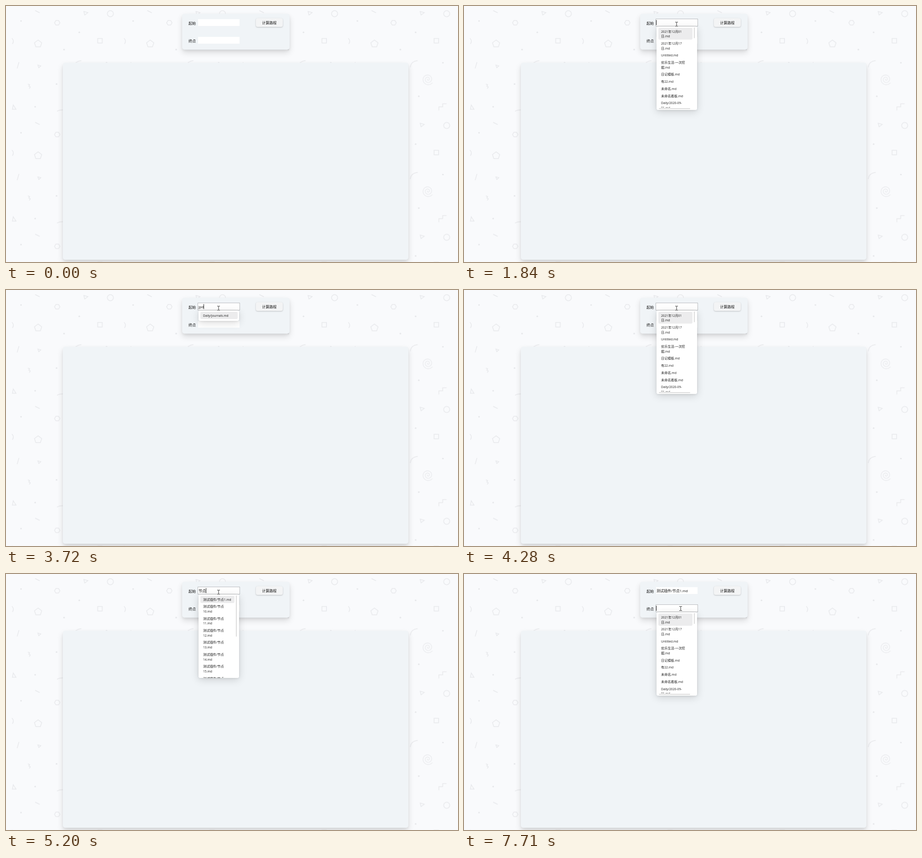
Recreate the animation shown at these times as an HTML page. Size 993 by 564 pixels, loop 8000 ms.

```html
<!DOCTYPE html>
<html>
<head>
<meta charset="utf-8">
<title>Path search</title>
<style>
html, body { margin: 0; width: 100%; height: 100%; overflow: hidden; background: #f9fafc; }
body { position: relative; font: 8px/12px "Open Sans", "Noto Sans CJK SC", "Noto Sans CJK", sans-serif; color: #111; }
div, svg { position: absolute; box-sizing: border-box; }
div { white-space: pre; }
b { font-weight: inherit; font-size: .94em; line-height: 0; }
.card { background: #f0f4f7; border-radius: 5px; box-shadow: 0 7px 14px rgba(0,0,0,.12), 0 3px 5px rgba(0,0,0,.06); }
.field { left: 421px; width: 93px; height: 17px; padding-left: 1px; line-height: 15px; background: #fff; background-clip: padding-box; border: 1px solid transparent; }
.field.on { border-color: #b8babd; }
.button { left: 549px; top: 27px; width: 59px; height: 19px; border-radius: 4px; background: #f3f4f5; line-height: 19px; text-align: center; box-shadow: 0 1px 3px rgba(0,0,0,.22); }
.popup { left: 423px; width: 89px; background: #fff; border-radius: 4px; overflow: hidden; font-size: 7.2px; line-height: 10.7px; color: #1c1c1c; }
.shade { left: 423px; width: 89px; border-radius: 4px; box-shadow: 0 1px 5px rgba(0,0,0,.09), 0 4px 18px rgba(0,0,0,.15); }
.list { left: 4px; top: 3px; overflow: hidden; }
.list div { position: static; padding: 2.5px 6px; border-radius: 3px; }
.list div:first-child { background: #ececed; }
.bar { background: #dcdcdc; border-radius: 1px; }
#caret { width: 1px; height: 11px; background: #222; }
</style>
</head>
<body>
<svg width="993" height="564">
  <defs>
    <pattern id="tile" width="246.3" height="246.3" patternUnits="userSpaceOnUse">
      <g fill="none" stroke="#e7e8eb" stroke-width="1.5">
        <path d="M64 10l10 5M171 12l9 2.500-7 5.500zM13 71q6 6 1 12.500M28.500 123.500l-4 14M70 130l6.500 2-4.500 4zM16 218l6 9.500-8 0zM149.500 135q1-13 16-14.500M112 232q6-4 18-3M212 230v-8h8.500v-6.500h8.500M48 172l4 1.500-2 3 3.500 2-2.500 3.500"/>
        <path d="M106.500 37l3-5h6l3 5-3 5h-6zM70.500 75l8 6-3 9h-10l-3-9z"/>
        <circle cx="229.300" cy="17" r="6.700"/>
        <rect x="201.500" y="71.500" width="10" height="10"/>
        <path id="spiral" stroke-width="1.200"/>
      </g>
      <g id="dots" fill="#e4e5e8"></g>
    </pattern>
  </defs>
  <rect width="993" height="564" fill="url(#tile)"/>
</svg>
<div class="card" style="left:387px;top:17px;width:236px;height:78.500px"></div>
<div class="card" style="left:125px;top:125px;width:759px;height:434px"></div>
<div style="left:401px;top:31.500px">起始</div>
<div style="left:401px;top:71px">终点</div>
<div class="button">计算路程</div>
<div class="field" id="from" style="top:28px"></div>
<div class="field" id="to" style="top:67.300px"></div>
<div class="shade" id="shade"></div>
<div class="popup" id="popup"></div>
<div id="caret"></div>
<svg id="mouse" width="30" height="30" viewBox="-15 -15 30 30">
  <g id="arrow">
    <circle r="7.500" fill="#fdec1e" opacity=".88"/>
    <path d="M.500-1.500v9.500l2.200-2 1.600 3.700 1.700-.700-1.600-3.600h3z" fill="#fff" stroke="#333" stroke-width=".9"/>
  </g>
  <path id="beam" d="M-3-4.500h2.300l.700.500.700-.500h2.300M0-4v8M-3 4.500h2.300l.700-.500.700.500h2.300" fill="none" stroke="#333"/>
</svg>
<script>
const $ = id => document.getElementById(id);
const LOOP = 8000;

const dots = [[33, 33], [161, 58], [127.5, 96], [111, 172], [221, 125], [168, 199], [64, 222]];
$('dots').innerHTML = dots.map(([x, y]) => `<circle cx="${x}" cy="${y}" r="1.7"/>`).join('');

let spiral = '';
for (let a = 0; a < 16.3; a += .2) {
  const dir = 16.85 - a, r = a * .78;
  spiral += `${a ? 'L' : 'M'}${188 + r * Math.cos(dir)} ${161.5 + r * Math.sin(dir)}`;
}
$('spiral').setAttribute('d', spiral);

// Latin runs are set slightly smaller than the Chinese text.
const rich = s => s.replace(/[!-~]+/g, '<b>$&</b>');

const bar = (x, y, w, h) => `<div class="bar" style="left:${x}px;top:${y}px;width:${w}px;height:${h}px"></div>`;
const menu = (items, width, clip, height, bars = '') => ({
  height,
  html: `<div class="list" style="width:${width}px;height:${clip}px">` +
    items.map(s => `<div>${rich(s)}</div>`).join('') + '</div>' + bars
});
const nodes = ['测试插件/节点1.md'];
for (let n = 10; n < 17; n++) nodes.push(`测试插件/节点\n${n}.md`);
const menus = {
  all: menu(['2021年12月01\n日.md', '2021年12月17\n日.md', 'Untitled.md', '优乐生活-一次挖\n掘.md', '日记模板.md',
    '有22.md', '未命名.md', '未命名看板.md', 'Daily/2020-09-\n01.md'], 75, 175.5, 184,
    bar(81.5, 1.5, 2, 24) + bar(5, 180, 69, 2)),
  one: menu(['Daily/journals.md'], 82, 17, 22.5),
  nodes: menu(nodes, 75, 181, 184, bar(81.5, 1.5, 2, 91))
};

// Each track holds its value until the next entry.
const fromText = [[0, ''], [2870, 'j'], [3000, 'jp'], [3260, 'jpd'], [3460, 'jpdm'], [3720, 'jpd'], [3940, 'jp'], [4080, 'j'],
  [4280, ''], [4540, 'j'], [4610, 'jie'], [4680, 'jiedian'], [5070, '节点'], [7020, '测试插件/节点1.md']];
const openMenu = [[0, ''], [1630, 'all'], [2870, 'one'], [4280, 'all'], [4610, ''], [5070, 'nodes'], [7020, ''], [7500, 'all']];
const focus = [[0, ''], [1560, 'from'], [7090, ''], [7450, 'to']];
const caretOn = [[0, 0], [1560, 1], [2360, 0], [2870, 1], [4280, 0], [4540, 1], [5730, 0], [7450, 1]];
const path = [[520, 820, 551], [1280, 463, 61], [1500, 467, 40], [5870, 467, 40], [5980, 560, 37], [6070, 683, 85],
  [6220, 683, 85], [6950, 488.5, 53.5], [7050, 488.5, 53.5], [7400, 476, 76]];

const at = (track, t) => track.findLast(k => k[0] <= t)[1];
const setHtml = (el, html) => { if (el.source !== html) el.innerHTML = el.source = html; };
const show = (el, on) => el.style.display = on ? '' : 'none';
const place = (el, x, y) => { el.style.left = x + 'px'; el.style.top = y + 'px'; };

function mouseAt(t) {
  const i = path.findLastIndex(k => k[0] <= t);
  const [t0, x0, y0] = path[i], [t1, x1, y1] = path[i + 1] || [LOOP, x0, y0];
  const p = (t - t0) / (t1 - t0), e = p * p * (3 - 2 * p);
  return [x0 + (x1 - x0) * e, y0 + (y1 - y0) * e];
}

function draw(t) {
  const active = at(focus, t), kind = at(openMenu, t), drop = active === 'to' ? 39.3 : 0;
  setHtml($('from'), rich(at(fromText, t)));
  for (const id of ['from', 'to']) $(id).classList.toggle('on', active === id);

  for (const id of ['shade', 'popup']) {
    show($(id), kind);
    if (!kind) continue;
    $(id).style.top = 45 + drop + 'px';
    $(id).style.height = menus[kind].height + 'px';
  }
  if (kind) setHtml($('popup'), menus[kind].html);

  show($('caret'), at(caretOn, t));
  const range = document.createRange();
  range.selectNodeContents($('from'));
  const end = active === 'from' && range.toString() ? range.getBoundingClientRect().right : 422;
  place($('caret'), end, 31 + drop);

  show($('mouse'), t >= path[0][0]);
  if (t < path[0][0]) return;
  const [x, y] = mouseAt(t);
  const inField = x > 421 && x < 514 && (y > 28 && y < 45 || y > 68 && y < 85);
  show($('beam'), inField);
  show($('arrow'), !inField);
  place($('mouse'), x - 15, y - 15);
}

const start = performance.now();
function tick() {
  draw((performance.now() - start) % LOOP);
  requestAnimationFrame(tick);
}
tick();
</script>
</body>
</html>
```
